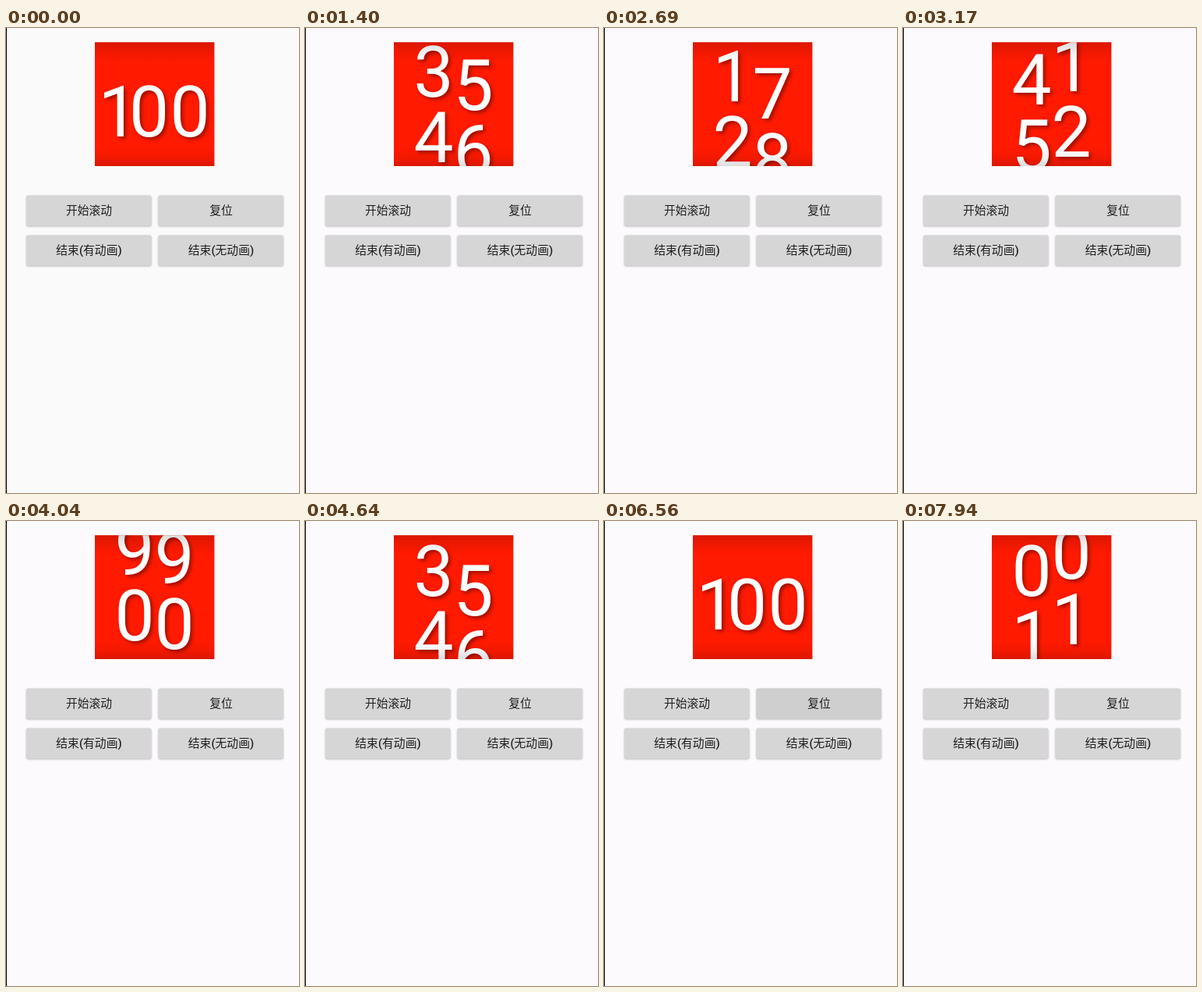
These frames come from a looping animation (376 by 596 pixels, 8000 ms). An HTML page:

```html
<!DOCTYPE html>
<html lang="zh-CN">
<head>
<meta charset="utf-8">
<style>
html, body { margin: 0; width: 100%; height: 100%; overflow: hidden; background: #fafafa; }
svg { display: block; width: 376px; height: 596px; }
.digits { font: 400 91px Roboto, sans-serif; fill: #fff; filter: drop-shadow(3px 3px 2px rgba(0,0,0,.36)); }
.buttons { font: 500 14.8px Roboto, "Noto Sans CJK SC", "Noto Sans CJK", sans-serif; fill: #202020; text-anchor: middle; }
.face { fill: #d6d6d7; filter: drop-shadow(0 1px 1px rgba(0,0,0,.26)); }
</style>
</head>
<body>
<svg viewBox="0 0 376 596">
  <defs>
    <clipPath id="window"><rect x="114" y="18.3" width="153.4" height="158.7"/></clipPath>
    <linearGradient id="shade" x2="0" y2="1">
      <stop offset="0" stop-opacity=".15"/>
      <stop offset=".06" stop-opacity=".08"/>
      <stop offset=".16" stop-opacity="0"/>
      <stop offset=".86" stop-opacity="0"/>
      <stop offset=".94" stop-opacity=".06"/>
      <stop offset="1" stop-opacity=".14"/>
    </linearGradient>
  </defs>
  <rect id="page" width="376" height="596" fill="#fafafa"/>
  <rect width="1" height="596"/>
  <g clip-path="url(#window)">
    <rect x="114" y="18" width="154" height="159" fill="#ff1a00"/>
    <g id="digits" class="digits"></g>
    <rect x="114" y="18" width="154" height="159" fill="url(#shade)"/>
  </g>
  <g id="buttons" class="buttons"></g>
</svg>
<script>
const LOOP = 8000, PITCH = 84, BASE = 139;
const START = 813, RESTART = 7857, DONE = 5720;
const REELS = [
  { x: 139.4, speed: 6.143, stop: 30 },
  { x: 190.5, speed: 9.2, stop: 40 }
];
const REST = [[1, 118.5], [0, 158], [0, 210.5]];
const BUTTONS = [
  ['开始滚动', 26, 214.4], ['复位', 195.5, 214.4],
  ['结束(有动画)', 26, 265.4], ['结束(无动画)', 195.5, 265.4]
];

const byId = id => document.getElementById(id);
const clamp = v => Math.max(0, Math.min(1, v));

function add(parent, tag, attrs, text = '') {
  const el = document.createElementNS('http://www.w3.org/2000/svg', tag);
  for (const k in attrs) el.setAttribute(k, attrs[k]);
  el.textContent = text;
  return parent.appendChild(el);
}

const overlays = BUTTONS.map(([label, x, y]) => {
  const box = { x, y, width: 160.5, height: 39, rx: 2 };
  add(byId('buttons'), 'rect', { ...box, class: 'face' });
  const over = add(byId('buttons'), 'rect', { ...box, fill: '#000', opacity: 0 });
  add(byId('buttons'), 'text', { x: x + 80.5, y: y + 24.7 }, label);
  return over;
});

const glyphs = Array.from({ length: 4 }, () => add(byId('digits'), 'text', {}));

function place(i, digit, x, y) {
  glyphs[i].textContent = digit;
  glyphs[i].setAttribute('x', x);
  glyphs[i].setAttribute('y', y);
}

// Highlight that fades in on touch and out after release
const press = (t, from) =>
  0.05 * clamp((t - from) / 100) * clamp(1 - (t - from - 200) / 150);

function draw(t) {
  byId('page').setAttribute('fill', t < 500 ? '#fafafa' : '#fcfafd');

  if (t < START || (t >= DONE && t < RESTART)) {
    REST.forEach(([d, x], i) => place(i, d, x, BASE));
    place(3, '', 0, 0);
  } else {
    const elapsed = (t - (t < RESTART ? START : RESTART)) / 1000;
    REELS.forEach(({ x, speed, stop }, i) => {
      const v = Math.min(stop, elapsed * speed);
      const n = Math.floor(v), y = BASE - (v - n) * PITCH;
      place(i * 2, n % 10, x, y);
      place(i * 2 + 1, v < stop ? (n + 1) % 10 : '', x, y + PITCH);
    });
  }

  const levels = [
    press(t, 500) + press(t, 7550),
    t >= 6560 && t < 6680 ? 0.03 : 0,
    press(t, 4750),
    0
  ];
  overlays.forEach((o, i) => o.setAttribute('opacity', levels[i]));
}

const begin = performance.now();
function tick() {
  draw((performance.now() - begin) % LOOP);
  requestAnimationFrame(tick);
}
tick();
</script>
</body>
</html>
```
